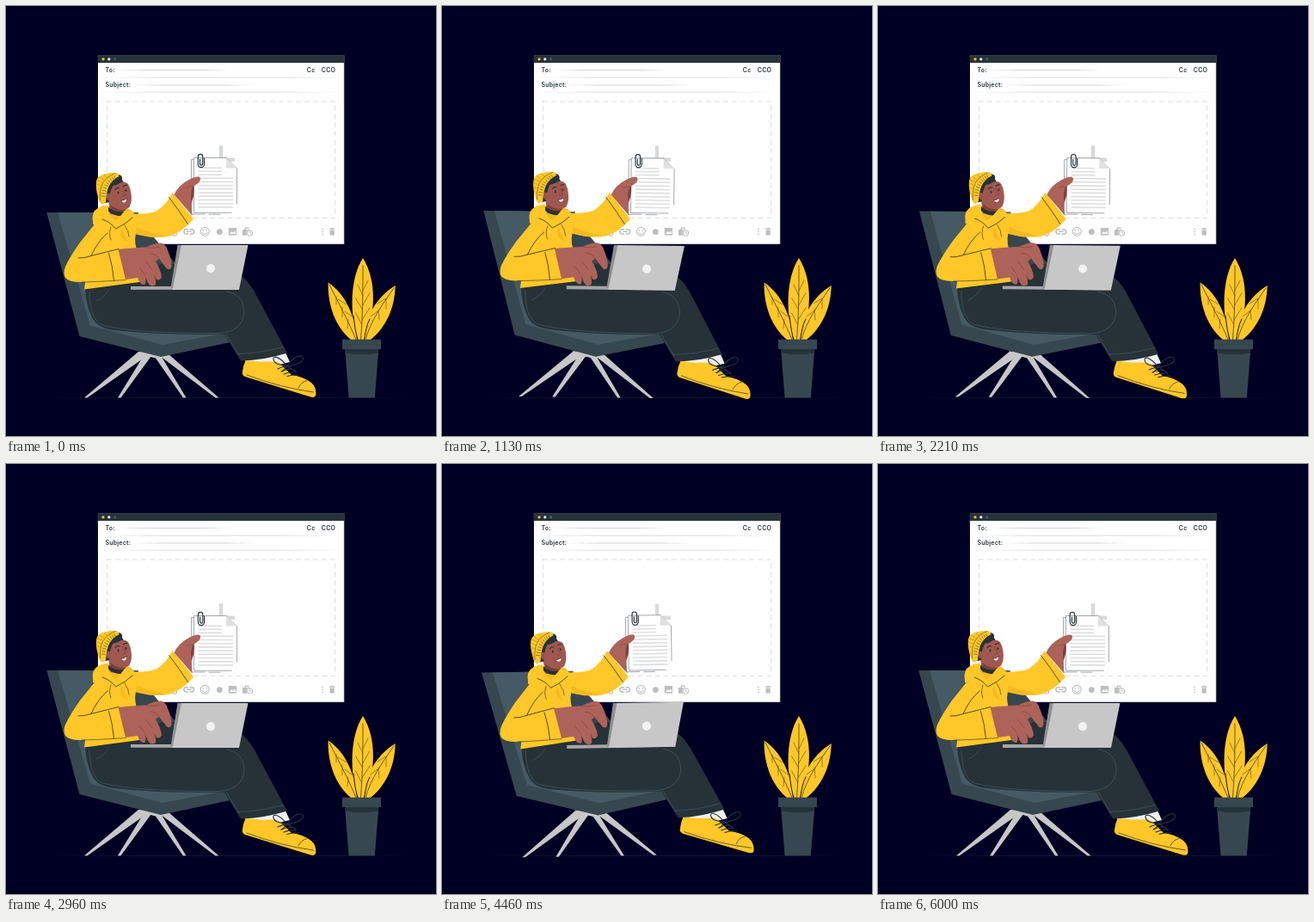
An HTML page with a canvas that plays this animation: 500 by 500 pixels, repeating every 6.04 s.

```html
<!DOCTYPE html>
<html lang="en">
<head>
<meta charset="utf-8">
<title>Attachments</title>
<style>
html, body { margin: 0; width: 100%; height: 100%; overflow: hidden; background: #000024; }
canvas { display: block; width: 500px; height: 500px; }
</style>
</head>
<body>
<canvas id="stage"></canvas>
<script>
const canvas = document.getElementById('stage');
const ctx = canvas.getContext('2d');
const ratio = window.devicePixelRatio || 1;
canvas.width = canvas.height = 500 * ratio;

const LOOP = 6040;
const SWING = Math.PI / 180;
const PIVOT = [204, 314];

const NAVY = '#000024', INK = '#263238', SLATE = '#37474f', STEEL = '#455a64';
const YELLOW = '#ffc727', AMBER = '#f2b921', SKIN = '#ad6359', FACE = '#9f5850', SHADE = '#7d4039';
const GREY = '#c7c7c7', ICON = '#bdbdbd', PALE = '#dedede';

const paths = new Map();
function path(d) {
  if (!paths.has(d)) paths.set(d, new Path2D(d));
  return paths.get(d);
}
function fill(color, d) {
  ctx.fillStyle = color;
  ctx.fill(path(d));
}
function line(color, width, d) {
  ctx.strokeStyle = color;
  ctx.lineWidth = width;
  ctx.stroke(path(d));
}
function rect(color, x, y, w, h) {
  ctx.fillStyle = color;
  ctx.fillRect(x, y, w, h);
}
function dot(color, x, y, r) {
  ctx.fillStyle = color;
  ctx.beginPath();
  ctx.arc(x, y, r, 0, 7);
  ctx.fill();
}
function oval(color, x, y, rx, ry, turn) {
  ctx.fillStyle = color;
  ctx.beginPath();
  ctx.ellipse(x, y, rx, ry, turn, 0, 7);
  ctx.fill();
}
// Hairline that fades out at both ends
function fadeLine(rgb, x1, x2, y, h) {
  const g = ctx.createLinearGradient(x1, 0, x2, 0);
  g.addColorStop(0, `rgba(${rgb},0)`);
  g.addColorStop(0.25, `rgba(${rgb},1)`);
  g.addColorStop(0.75, `rgba(${rgb},1)`);
  g.addColorStop(1, `rgba(${rgb},0)`);
  rect(g, x1, y, x2 - x1, h);
}

function drawIcons() {
  line(ICON, 1.2, 'M194 261v4a2.2 2.2 0 0 0 4.400 0v-5a1.500 1.500 0 0 0-3 0');
  line(ICON, 1.5, 'M211.500 259.700h-2a2.600 2.600 0 0 0 0 5.200h2M214 259.700h2a2.600 2.600 0 0 1 0 5.200h-2M210.500 262.300h4.600');
  line(ICON, 1.1, 'M236.300 262.300a5 5 0 1 1-10 0a5 5 0 1 1 10 0M228.500 263.500q2.800 3.800 5.600 0');
  dot(ICON, 229.4, 260.9, 0.8);
  dot(ICON, 233.2, 260.9, 0.8);
  dot(ICON, 248.3, 262.6, 3.4);
  rect(ICON, 258.8, 258, 9.2, 8.6);
  fill('#fff', 'M260 265l2.300-3 1.700 1.800 1.800-2.500 1.700 3.700z');
  fill(ICON, 'M275 260h2.500v-2.500h5v2.500h2v6.800h-9.500z');
  rect('#fff', 278.8, 258.7, 2.6, 1.4);
  dot('#fff', 283.5, 264, 4);
  line(ICON, 1, 'M286.800 264a3.300 3.300 0 1 1-6.600 0a3.300 3.300 0 1 1 6.600 0M283.500 262v2.100l1.300.8');
  for (let i = 0; i < 3; i++) dot(ICON, 368, 259.3 + i * 3, 0.85);
  fill(ICON, 'M376 258.600h2l.6-.8h1.500l.6.8h1.700v1.200h-6.400zM376.600 260.400h5.200v6.200h-5.200z');
}

function drawWindow() {
  rect('#fff', 107, 57.5, 286.3, 219.5);
  rect(INK, 107, 57.3, 286.3, 8.8);
  line(INK, 0.5, 'M106.900 57.500h286.400v219.500h-286.400z');
  dot(YELLOW, 113, 61.8, 1.6);
  dot('#fff', 119.8, 61.8, 1.6);
  dot(STEEL, 126.6, 61.8, 1.6);

  ctx.font = '600 7px Inter, "Open Sans", sans-serif';
  ctx.letterSpacing = '0.2px';
  ctx.fillStyle = INK;
  ctx.fillText('To:', 115.5, 77.2);
  ctx.fillText('Subject:', 115.5, 94.2);
  ctx.fillText('Cc', 349.8, 77.2);
  ctx.fillText('CCO', 366.8, 77.2);

  fadeLine('200,200,200', 130, 262, 74, 0.8);
  fadeLine('200,200,200', 146, 290, 91.6, 0.8);
  fadeLine('205,205,205', 108, 392, 82.8, 0.7);
  fadeLine('210,210,210', 108, 392, 99.8, 0.7);

  ctx.setLineDash([5, 5]);
  line('#d6d6d6', 0.8, 'M117.500 111h265v135.500h-265z');
  ctx.setLineDash([]);
  rect('#d9d9d9', 247.8, 162.5, 4.4, 32);
  rect('#d9d9d9', 234, 176.5, 32, 4.4);
  drawIcons();
}

function drawPlant() {
  fill(YELLOW, 'M408 388C406 362 396 336 374.600 321.500C374 350 384 374 401 388z');
  fill(YELLOW, 'M416 388C418 361 430 339 452.700 325C452 353 441 374 424 388z');
  fill(YELLOW, 'M409 388C400 360 399 318 415 293C432 320 429 360 417 388z');
  line(INK, 0.7, 'M376 324C388 348 398 366 407 388M451 328C437 348 424 366 418 388M415 302C415 330 415 360 412.500 388');
  line(INK, 0.5, 'M384 338l0 9M391 350l0 12M398 364l-1 11M386 341l10 6M394 355l8 6');
  line(INK, 0.5, 'M442 341l0 11M433 353l1 12M442 340l-10 6M432 355l-8 6');
  line(INK, 0.5, 'M415 331l6-12M414.800 348l8-14M414 365l9-14M415 337l-6-13M414.600 353l-8-13M413.500 370l-7-13');
  line(NAVY, 0.9, 'M409 388C405 374 405 366 404 360M416.500 388C419 374 420 370 423 364');
  fill(SLATE, 'M394 398h39.400l-4.600 57.500h-30.200z');
  fill(INK, 'M394.300 399h39l-.5 4.500q-18 3-38.200 0z');
  rect(SLATE, 391, 387.7, 45, 11.3);
}

function drawChair() {
  fill(GREY, 'M154 402L165 406L94.500 455.500H91z');
  fill(GREY, 'M161 405L169 407L133.500 455.500H130z');
  fill(GREY, 'M173 408L181 408L209.500 455.500H206z');
  fill(GREY, 'M179 407L189 405L247.500 455.500H243.500z');
  fill(GREY, 'M153 402L190 403L186 408Q179 411 172 409L160 406z');
  fill(SLATE, 'M47.300 240H148L262 378L261 391L180 408L85.500 384z');
  fill(STEEL, 'M60 240H154L150 264L152 310L262 379L182 394L98 371.500z');
}

function drawLegs() {
  // Foot
  fill('#f0f0f0', 'M278 411L325 403L330 414L306 420L279 417z');
  fill(YELLOW, 'M279 411.500Q290 414 305 413.500Q313 413 318 415L332 429Q346 431 355 438Q361 443 360.300 452Q359.500 456 354 454.500L278 431Q274 429 275 425Q276 417 279 411.500z');
  line(INK, 0.7, 'M280 429Q320 444 357.500 449M340 444Q343 437 350 435.500');
  line(INK, 1.1, 'M316 422Q325 418 331 419M320 425Q327 421 334 422.500M323 428Q330 425 338 426M327 430.500Q335 428 341 429');
  line(INK, 1.1, 'M327 419C318 407 310 406 311 411C312 417 320 417 327 419C333 408 344 404 345.500 409C346 415 336 417 327 419L321 425M327 419L337 425');

  // Lower leg, then both thighs
  fill(INK, 'M180 302L262 312L275 315Q284 322 293 340L327 403.500Q300 412 273 412.500L251 377L245 330z');
  line(STEEL, 0.7, 'M270 404.500Q295 404 322 396.500M254 378L271 406');
  fill(INK, 'M92 328L152 314L180 300L200 300L265 314L271 332Q278 342 277 358Q274 379 252 381.500Q180 383 126 377Q106 375 100 362Q93 348 92 328z');
  line(STEEL, 0.7, 'M97 332Q97 364 112 371Q150 381 248 380.500Q275 378 277 357Q277 335 256 332');
  line(STEEL, 0.6, 'M120 329Q116 338 105 343');
}

function drawLaptop() {
  rect('#a6a6a6', 145, 326, 126, 3.9);
  fill('#8f8f8f', 'M199.500 278H205L196 328H191.500z');
  fill(GREY, 'M204 278H281.500L271 329.900H193.500z');
  dot('#f2f2f2', 238, 305.2, 5.1);
}

function drawBody() {
  // Reaching arm and torso
  fill(YELLOW, 'M138 241Q160 243 174 239Q187 231 193.500 217L218 247.500Q201 268 181 269Q163 269 148 264z');
  fill(AMBER, 'M151 257Q165 264 185 267Q177 269.500 166 268.500L149 265z');
  line(INK, 0.8, 'M189.500 222.500Q200 236 211.500 253.500');
  fill(YELLOW, 'M106 250L147 245Q154 252 151 264Q148 277 155 291L155 321L91 329.500L95 300L84 285Q93 268 106 250z');
  fill(AMBER, 'M135 258Q138 269 142 274Q137 273 134 268Q132 263 135 258z');

  // Neck and hood
  fill(AMBER, 'M101 247Q101 236 114 233L140 235Q151 238 149 246L127 257z');
  fill(FACE, 'M119 225L139 230V245L121 242z');
  fill(SHADE, 'M122 231Q130 238 138 236.500L138 240Q128 240 121 235z');
  fill(INK, 'M119 234Q128 241 138 239L138 243Q130 246.500 119 239z');
  fill(YELLOW, 'M101 251Q99 239 107 235Q114 231 119 232Q117 242 127 250Q134 244 138 238Q148 237 150 244Q149 250 128 260Q115 254 101 254z');
  line(INK, 0.8, 'M112 248Q121 251 127.500 259Q139 254 147 246');
  line(INK, 0.6, 'M122 257Q119 265 122 272M138 255Q143 262 143 268');

  // Resting arm
  fill(YELLOW, 'M106 250Q94 265 86 275Q74 292 69 303Q66 311 69 316Q73 321 86 321Q112 321 139 318.500L131 282Q116 286 101 290L117 262z');
  line(INK, 0.8, 'M119.500 287.500Q124 302 125.500 319M118 264Q107 273 99 290.500Q91 293.500 84 293M99 290.500L131 282.500');
  line(INK, 0.6, 'M88 321Q104 321 139 318.500');
}

function drawHand() {
  fill(SKIN, 'M130.500 283Q150 281 163 280.500Q171 276 180 275.500Q186 277 188 284Q193 296 192.500 303Q191 308 187 305.500L178 294L174 297Q180 307 181 315Q179 320 175 318L170 307Q175 316 174 324Q169 328 165 322L161 312Q164 319 161.500 324Q156 325 153 316L139 318z');
  line(SHADE, 0.6, 'M164 281Q172 282 179 280M178 294Q173 287 167 288M170 307L163 298M161 312L155 304');
}

function drawPapers() {
  const edge = '#59636a';
  fill('#fff', 'M215.500 178.500H256V242H215.500z');
  line(edge, 0.55, 'M219 178.500H215.500V242H231M236 242.200H249');
  fill('#fff', 'M218.500 176.500H256L268.500 189V240.300H218.500z');
  line(edge, 0.55, 'M256 176.500H218.500V240.300H262M256 176.500L268.500 189V230');
  fill('#e0e0e0', 'M256 176.500V188.500H268.500z');
  for (let i = 0; i < 3; i++) rect(PALE, 223.5, 187.5 + i * 4, 27.5, 1.5);
  for (let i = 0; i < 9; i++) rect(PALE, 223.5, 199.5 + i * 4.2, 40.5, 1.6);
  line(INK, 1.15, 'M225.500 178V183.500a1.600 1.600 0 0 0 3.200 0V175a2.700 2.700 0 0 0-5.400 0V184a3.600 3.600 0 0 0 7.200 0V177');
}

function drawGrip() {
  fill(SHADE, 'M205 210L218.500 207Q220 222 214 232z');
  fill(SKIN, 'M195.500 219.500Q200 209 211 203Q219 198 224.500 198.500Q227.500 201 224.500 205Q221 208.500 217 210Q214 219 215.500 225Q215.500 232 216.500 243.500z');
  line(SHADE, 0.6, 'M217 210Q212 209 209 212');
}

function drawHead() {
  fill(INK, 'M115 229Q114 210 124 199L131 196Q136 197 135 202L138 207L121 228z');
  fill(FACE, 'M124 209Q130 208 134 205Q139 204 142 207Q145 212 145.500 218Q147 227 143.500 234Q139 238 133 236.500Q125 235 120 229Q119 220 124 209z');
  oval(FACE, 119.3, 222, 2.7, 4.4, -0.3);
  line(SHADE, 0.6, 'M118.500 220Q120.500 222 119.500 225');
  oval(INK, 130.6, 217, 0.9, 1.5, -0.2);
  oval(INK, 139.4, 214.5, 0.9, 1.4, -0.2);
  line(INK, 1.1, 'M127 213.500Q129 211 131.500 211.700M136.500 209.800Q138.500 207.800 140.500 208.700');
  line(SHADE, 0.8, 'M136 213Q139 218 139 220Q137.500 221.500 135.500 221');
  fill('#fff', 'M134 226.500Q137.500 226.500 139.800 224.300Q140 228 137.500 228.500Q135.500 228.500 134 226.500z');
  line(INK, 0.6, 'M133.500 226.300Q137.500 226.500 140.300 224');

  // Beanie with a ribbed cuff
  fill(YELLOW, 'M105 204Q106 197 116 195Q125 193 130 194.500L131.500 198Q123 202 119 211Q116 219 116 228L112 231Q108 229 107 222Q104 212 105 204z');
  line(INK, 0.5, 'M127 194.500Q117 198 112 207Q108.500 215 109.500 226');
  for (let i = 0; i < 10; i++) {
    const a = 3.25 + i * 0.125;
    const c = Math.cos(a), s = Math.sin(a);
    ctx.beginPath();
    ctx.moveTo(133 + 22 * c, 224 + 28 * s);
    ctx.lineTo(133 + 18 * c, 224 + 25 * s);
    ctx.stroke();
  }
  line('#9b7a22', 0.5, 'M106 207l4 2M106 203l6 2M109 199l5 4M114 196.500l4 3.500M106 212l3 1');
}

function drawFigure() {
  drawChair();
  drawLegs();
  drawBody();
  drawLaptop();
  drawHand();
  drawPapers();
  drawGrip();
  drawHead();
}

// Linear swing: 0 → 1 → -1 → 0
function sway(p) {
  if (p < 0.25) return 4 * p;
  return p < 0.75 ? 2 - 4 * p : 4 * p - 4;
}

function draw() {
  const p = (performance.now() % LOOP) / LOOP;
  ctx.setTransform(ratio, 0, 0, ratio, 0, 0);
  ctx.lineCap = ctx.lineJoin = 'round';
  rect(NAVY, 0, 0, 500, 500);
  fadeLine('26,32,52', 50, 470, 455.2, 0.7);
  drawWindow();
  drawPlant();
  ctx.translate(...PIVOT);
  ctx.rotate(SWING * sway(p));
  ctx.translate(-PIVOT[0], -PIVOT[1]);
  drawFigure();
  requestAnimationFrame(draw);
}
draw();
</script>
</body>
</html>
```
